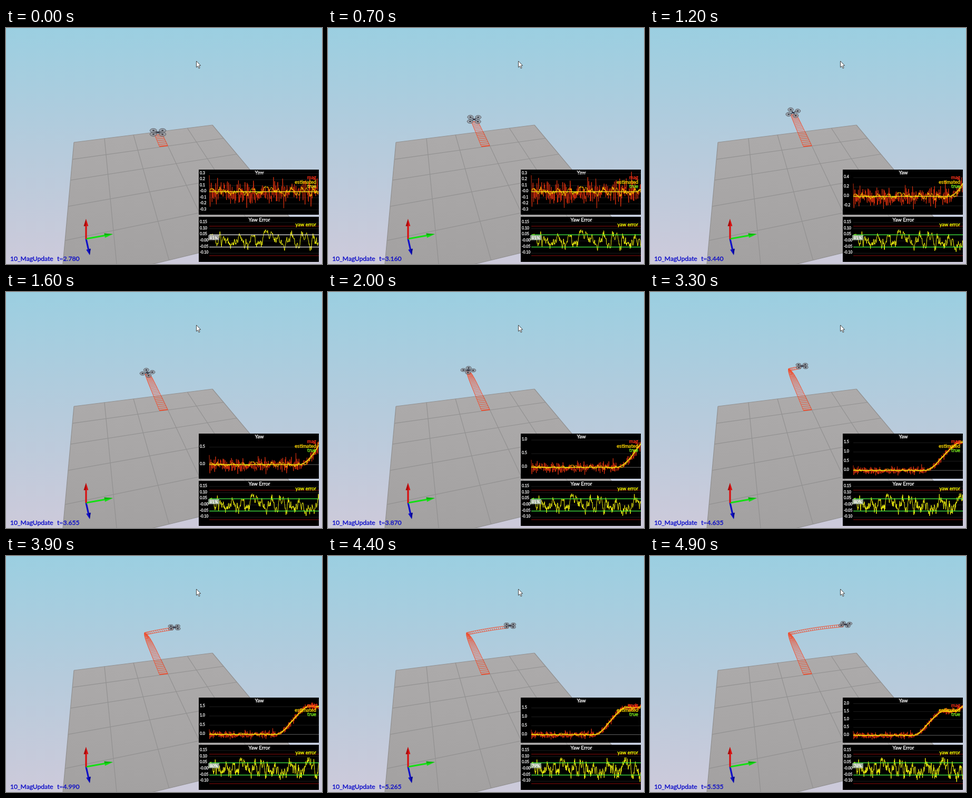
An HTML page with a canvas for the animation above (5000 ms loop, 600 px wide and 450 px high).

```html
<!DOCTYPE html>
<html>
<head>
<meta charset="utf-8">
<style>
html, body { margin: 0; height: 100%; overflow: hidden }
canvas { display: block }
</style>
</head>
<body>
<canvas id="stage" width="600" height="450"></canvas>
<script>
const g = document.getElementById('stage').getContext('2d');
const LOOP = 5000, STEP = 100, LIFTOFF = -526;
const { sin, cos, exp, min, max, round } = Math;

// Simulated seconds at a few moments of the loop; linear between them
const clockKeys = [[0, 2.78], [700, 3.16], [1200, 3.44], [2000, 3.87],
  [2700, 4.28], [3900, 4.99], [4900, 5.535]];

function clock(t) {
  let i = 0;
  while (i < clockKeys.length - 2 && t > clockKeys[i + 1][0]) i++;
  const [t0, a] = clockKeys[i], [t1, b] = clockKeys[i + 1];
  return a + (b - a) * (t - t0) / (t1 - t0);
}

function smooth(u) {
  u = min(max(u, 0), 1);
  return u * u * (3 - 2 * u);
}
// Two quarter turns, the second still under way at the end
const yaw = sec => 1.52 * (smooth((sec - 3) / 1.6) + smooth((sec - 5.05) / 1.6));

// Slowing climb, then a sideways leg with a soft start
function position(t) {
  const rest = max(0, 1 - t / 2700) ** 2.1;
  const s = max(0, t - 2540), ramp = 600;
  const dx = .0515 * (s < ramp ? s * s / (2 * ramp) : s - ramp / 2);
  return [265 + 23.5 * rest + dx, 146 + 53 * rest - .22 * dx + .0007 * dx * dx];
}

let seed = 41;
function rnd() {
  seed = (seed * 16807) % 2147483647;
  return seed / 2147483647;
}
const gauss = () => (rnd() + rnd() + rnd() + rnd() - 2) * 1.73;

const samples = [];
for (let i = 0, err = 0; i < 560; i++) {
  const t = i * .01, real = yaw(t);
  err = .85 * err + .021 * gauss();
  samples.push({ t, real, err, est: real + err, mag: real + .1 * gauss() });
}

function path(points) {
  g.beginPath();
  points.forEach(p => g.lineTo(p[0], p[1]));
}
function line(points, color, width = 1) {
  path(points);
  g.strokeStyle = color;
  g.lineWidth = width;
  g.stroke();
}
function fill(points, color) {
  path(points);
  g.fillStyle = color;
  g.fill();
}
function text(s, x, y, size, color, align = 'left') {
  g.font = size + 'px Lato, sans-serif';
  g.textAlign = align;
  g.fillStyle = g.strokeStyle = color;
  g.lineWidth = .35;
  g.fillText(s, x, y);
  g.strokeText(s, x, y);
}

// Floor coordinates, five cells each way, to the screen
function floor(u, v) {
  const w = 1 + .0263 * u - .0934 * v;
  return [(129 + 62.9 * u - 14.7 * v) / w, (218 - 1.735 * u + 8.94 * v) / w];
}

function scene() {
  const sky = g.createLinearGradient(0, 0, 0, 450);
  sky.addColorStop(0, '#9bcfe1');
  sky.addColorStop(.5, '#b5cbdc');
  sky.addColorStop(1, '#cdcada');
  g.fillStyle = sky;
  g.fillRect(0, 0, 600, 450);

  const ground = g.createLinearGradient(0, 185, 0, 450);
  ground.addColorStop(0, '#adabab');
  ground.addColorStop(1, '#a3a1a1');
  fill([floor(0, 0), floor(5, 0), floor(5, 5), floor(0, 5)], ground);
  for (let i = 0; i <= 5; i++) {
    line([floor(i, 0), floor(i, 5)], '#929191', 1.2);
    line([floor(0, i), floor(5, i)], '#929191', 1.2);
  }
}

function arrow(x, y, color, dark) {
  const ox = 152, oy = 402, len = Math.hypot(x - ox, y - oy);
  const dx = (x - ox) / len, dy = (y - oy) / len, head = min(16, len * .36);
  const bx = x - dx * head, by = y - dy * head;
  line([[ox, oy], [bx, by]], color, 3.2);
  fill([[bx - dy * 4.4, by + dx * 4.4], [x, y], [bx + dy * 4.4, by - dx * 4.4]], color);
  fill([[bx, by], [x, y], [bx + dy * 4.4, by - dx * 4.4]], dark);
}

// A ladder swept behind the drone, turning with its yaw
function drawTrail(t) {
  const left = [], right = [], red = '#f24a2a';
  const add = at => {
    const [x, y] = position(at), turn = yaw(clock(at)), c = cos(turn), s = sin(turn);
    const hx = (5 + (y - 146) / 26) * c + .5 * s, hy = 2.3 * s - .7 * c;
    left.push([x - hx, y + 2 - hy]);
    right.push([x + hx, y + 2 + hy]);
  };
  for (let at = LIFTOFF; at < t - 70; at += 75) add(at);
  add(t - 70);
  left.forEach((p, i) => line([p, right[i]], red, i ? .9 : 2));
  line(left, red, .9);
  line(right, red, .9);
}

function drone(t) {
  const [x, y] = position(t), turn = yaw(clock(t));
  const reach = 9 + 3.3 * exp(-t / 900);
  const squash = .39 + .27 * exp(-(((t - 1200) / 700) ** 2));
  const rx = reach * .53, ry = rx * (.38 + .5 * squash);
  for (let i = 0; i < 4; i++) {
    const a = turn + (i - .5) * Math.PI / 2;
    const px = x + reach * cos(a), py = y + reach * squash * sin(a);
    line([[x, y], [px, py]], '#30323a', 1.4);
    g.beginPath();
    g.ellipse(px, py, rx, ry, 0, 0, 7);
    g.fillStyle = 'rgba(146,150,158,.75)';
    g.fill();
    g.strokeStyle = '#55575e';
    g.lineWidth = .9;
    g.stroke();
    g.fillStyle = '#2c2d34';
    g.fillRect(px - 1.5, py - 1, 3, 2);
  }
  g.fillStyle = '#3a3c4c';
  g.fillRect(x - 2.5, y - 1.5, 5, 3);
}

function panel(y, title) {
  g.save();
  g.beginPath();
  g.rect(366, y, 228, 86);
  g.clip();
  g.fillStyle = '#000';
  g.fillRect(366, y, 228, 86);
  text(title, 481, y + 9, 9.6, '#fff', 'center');
}
function rule(y, color, width) {
  line([[386, y], [594, y]], color, width);
}
function tick(y, label, color) {
  rule(y, color);
  text(label, 368, y + 1, 7, '#eee');
}

function plots(now, percent, passed) {
  const shown = samples.filter(s => s.t <= now);
  const series = (key, toY, color, width) =>
    line(shown.map(s => [386 + 208 * s.t / now, toY(s[key])]), color, width);

  // The vertical range grows with the measured yaw
  panel(270, 'Yaw');
  const scale = 76 / (.35 + max(.31, .2 + 1.06 * yaw(now)));
  const yawY = v => 352.5 - (v + .35) * scale;
  const step = scale > 100 ? .1 : scale > 70 ? .2 : .5;
  for (let k = -4; k < 6; k++) {
    const y = yawY(k * step);
    if (y > 274 && y < 352)
      tick(y, (k || step > .1 ? '' : '-') + (k * step).toFixed(1), k ? '#1d1d1d' : '#666');
  }
  series('mag', yawY, '#d8300f', .9);
  series('est', yawY, '#ffc400', 1);
  series('real', yawY, '#f4f410', 1.3);
  text('mag', 589, 288, 9.4, '#ff3018', 'right');
  text('estimated', 589, 297, 9.4, '#ffd800', 'right');
  text('true', 589, 305, 9.4, passed ? '#84ff20' : '#ffff20', 'right');
  g.restore();

  panel(360, 'Yaw Error');
  const errY = v => 406 - v * 234;
  for (let k = -2; k <= 3; k++)
    tick(errY(k * .05), (k ? '' : '-') + (k * .05).toFixed(2), '#1d1d1d');
  for (const v of [-.12, .12]) rule(errY(v), '#8c0c0c');
  series('err', errY, '#eeee10', 1);
  for (const v of [-.05, .05]) rule(errY(v), passed ? '#40f040' : '#e4e4e4', 1.3);
  g.fillStyle = passed ? 'rgba(165,185,165,.85)' : 'rgba(160,160,160,.85)';
  g.fillRect(384, 395, 21, 9.5);
  text(percent + '%', 394.5, 403, 8, '#fff', 'center');
  text('yaw error', 589, 378, 9.4, '#ffff00', 'right');
  g.restore();
}

function cursor() {
  const shape = [[361.5, 63], [361.5, 75], [364.2, 72.6], [366.2, 77], [368, 76.2],
    [366.1, 71.9], [369.7, 71.7]];
  fill(shape, '#fff');
  line([...shape, shape[0]], '#333', .9);
}

function draw(t) {
  const now = round(clock(t) * 200) / 200;
  scene();
  drawTrail(t);
  drone(t);
  arrow(159, 433, '#1010c8', '#0a0a90');
  arrow(203, 393, '#12e012', '#0cb00c');
  arrow(152, 364, '#d81010', '#a80c0c');
  text('10_MagUpdate', 8, 444, 12.1, '#0c0cc8');
  text('t=' + now.toFixed(3), 97, 444, 12.2, '#0c0cc8');
  plots(now, round(81 - 3 * (t / 4900) ** 4), t >= 300);
  cursor();
}

function loop() {
  draw(Math.floor(performance.now() % LOOP / STEP) * STEP);
  requestAnimationFrame(loop);
}
loop();
</script>
</body>
</html>
```
